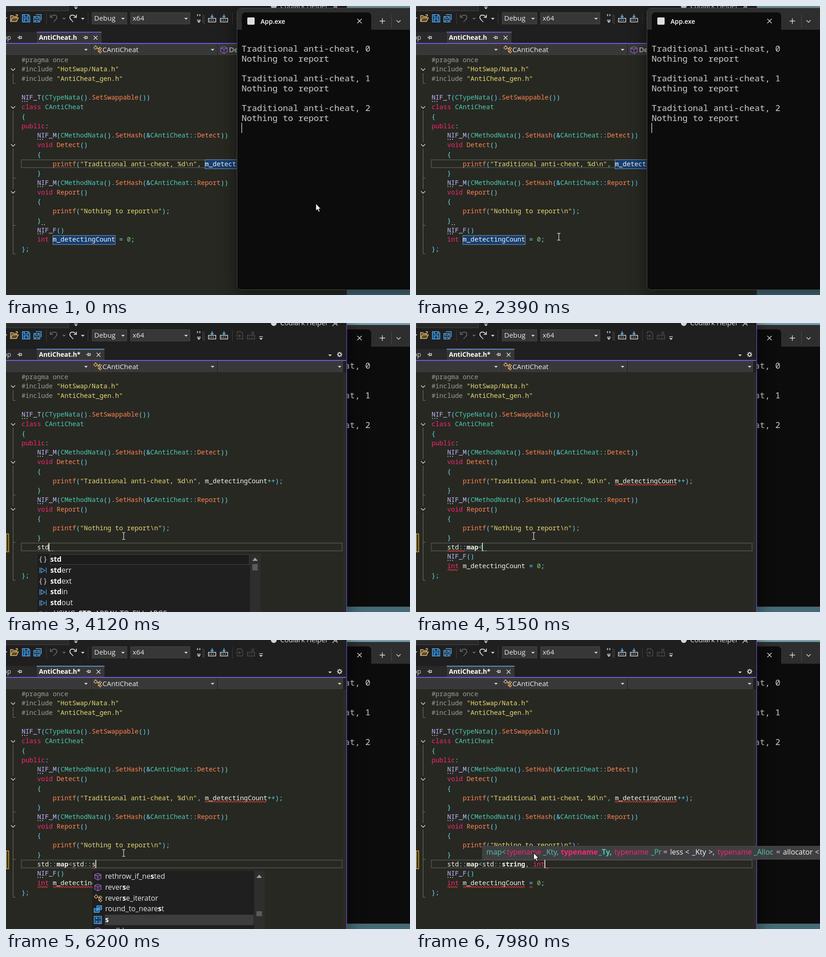
An HTML page with a canvas for the animation above (8000 ms loop, 884 by 633 pixels).

```html
<!DOCTYPE html>
<html lang="en">
<head>
<meta charset="utf-8">
<title>Editing a hot-swapped class</title>
<style>
  html, body { margin: 0; width: 100%; height: 100%; overflow: hidden; background: #1f1f1f; }
  canvas { display: block; }
</style>
</head>
<body>
<canvas id="stage" width="884" height="633"></canvas>
<script>
const ctx = document.getElementById('stage').getContext('2d');
const LOOP = 8000, FRONT = 2690, ENTER = 3620;
const MONO = '"Noto Sans Mono", "DejaVu Sans Mono", monospace', UI = '"Open Sans", "Noto Sans", sans-serif';
const CODE_FONT = '14.23px ' + MONO, TERMINAL_FONT = '500 18.8px ' + MONO;
const CHAR = 8.538, LEFT = 34, LINE = 20.73;
const WHITE = '#f4f4ee', CYAN = '#66d9ef', PINK = '#f92672', TEAL = '#4ec9b0', PURPLE = '#7160e8', BLUE = '#55aaf0';

const column = n => LEFT + n * CHAR;
const lineMid = n => 117.5 + n * LINE;

function rect(x, y, w, h, fill, stroke, width = 1) {
  if (fill) { ctx.fillStyle = fill; ctx.fillRect(x, y, w, h); }
  if (stroke) { ctx.strokeStyle = stroke; ctx.lineWidth = width; ctx.strokeRect(x + width / 2, y + width / 2, w - width, h - width); }
}
function rounded(x, y, w, h, radius, fill, stroke) {
  ctx.beginPath(); ctx.roundRect(x, y, w, h, radius);
  if (fill) { ctx.fillStyle = fill; ctx.fill(); }
  if (stroke) { ctx.strokeStyle = stroke; ctx.lineWidth = 1; ctx.stroke(); }
}
function windowShadow(x, y, w, h) {
  ctx.save();
  ctx.shadowColor = 'rgba(0, 0, 0, 0.5)'; ctx.shadowBlur = 36; ctx.shadowOffsetY = 8;
  rounded(x, y, w, h, 8, '#0c0c0c');
  ctx.restore();
}
function text(str, x, y, color, font) {
  ctx.font = font; ctx.fillStyle = color; ctx.fillText(str, x, y);
  return x + ctx.measureText(str).width;
}
const label = (str, x, y, color = '#ececec', size = 15.2, weight = 400) => text(str, x, y, color, `${weight} ${size}px ${UI}`);
function shape(d, x, y, stroke, width = 1.3, fill) {
  ctx.save(); ctx.translate(x, y);
  const path = new Path2D(d);
  if (fill) { ctx.fillStyle = fill; ctx.fill(path); }
  if (stroke) { ctx.strokeStyle = stroke; ctx.lineWidth = width; ctx.stroke(path); }
  ctx.restore();
}
const downArrow = (x, y, color = '#d6d6d6') => shape('M-4 -2H4L0 2Z', x, y, null, 0, color);
const chevron = (x, y, size = 4.5) => shape(`M${-size} ${-size / 2}L0 ${size / 2}L${size} ${-size / 2}`, x, y, '#dcdcdc', 1.4);
const cross = (x, y, size) => shape(`M${-size} ${-size}L${size} ${size}M${size} ${-size}L${-size} ${size}`, x, y, '#e4e4e4', 1.3);
const pin = (x, y) => shape('M-5 0H-1M-1 -4V4M-1 -2H4V2H-1M0 1.5H4', x, y, '#d8d8d8', 1.3);
function dots(x, y, count) {
  for (let i = 0; i < count; i++) rect(x + i * 5, y, 2, 2, '#a8a8a8');
}
function squiggle(x1, x2, line) {
  const y = lineMid(line) + 8.8;
  ctx.beginPath();
  for (let x = x1, i = 0; x <= x2; x += 2.5, i++) ctx.lineTo(x, y + (i % 2 ? -1.4 : 1.4));
  ctx.strokeStyle = '#e23c38'; ctx.lineWidth = 1.1; ctx.stroke();
}

const SOURCE = `#pragma once
#include "HotSwap/Nata.h"
#include "AntiCheat_gen.h"

NIF_T(CTypeNata().SetSwappable())
class CAntiCheat
{
public:
    NIF_M(CMethodNata().SetHash(&CAntiCheat::Detect))
    void Detect()
    {
        printf("Traditional anti-cheat, %d\\n", m_detectingCount++);
    }
    NIF_M(CMethodNata().SetHash(&CAntiCheat::Report))
    void Report()
    {
        printf("Nothing to report\\n");
    }
    NIF_F()
    int m_detectingCount = 0;
};`.split('\n');

const RULES = [
  [/^"/, '#e6db74'], [/^#/, '#9b9b9b'], [/^NIF_/, '#beb7ff'], [/^(class|public|void|int)$/, PINK],
  [/^(CTypeNata|CAntiCheat|CMethodNata)$/, TEAL], [/^(SetSwappable|SetHash|Detect|Report|printf)$/, '#ff8454'],
  [/^\d/, '#8cc56a'], [/^\w/, WHITE], [/./, CYAN]
];
function codeLine(str, line) {
  for (const m of str.matchAll(/"[^"]*"|#pragma once|#\w+|\w+|[^\s\w"]+/g)) {
    const color = RULES.find(([rule]) => rule.test(m[0]))[1];
    const weight = /^(map|string)$/.test(m[0]) ? 700 : 500;
    text(m[0], column(m.index), lineMid(line) + 5, color, weight + ' ' + CODE_FONT);
  }
}

// Completion lists: icon kind and entry
const STD = { width: 488, outlined: true, selected: 0, thumb: 528, items: [
  ['ns', 'std'], ['macro', 'stderr'], ['ns', 'stdext'], ['macro', 'stdin'], ['macro', 'stdout'], ['macro', '_USING_STD_ARRAY_TO_FILL_ARGS']] };
const NAMESPACE = { width: 461, outlined: true, selected: 0, thumb: 528, items: [
  ['cube', 'abort'], ['cube', 'abs'], ['cube', 'accumulate'], ['cube', 'acos'], ['cube', 'acosh'], ['class', 'add_const']] };
const MAP = { width: 461, selected: 1, thumb: 570, items: [
  ['cube', 'make_pair'], ['class', 'map'], ['class', 'match_results'], ['cube', 'max'], ['cube', 'max_element'], ['cube', 'merge']] };
const S_LIST = { width: 377, selected: 4, thumb: 594, items: [
  ['cube', 'rethrow_if_nested'], ['cube', 'reverse'], ['class', 'reverse_iterator'], ['enum', 'round_to_nearest'], ['snippet', 's'], ['cube', 'scalbln']] };
const STRING = { width: 373, selected: 0, thumb: 594, items: [
  ['class', 'string'], ['class', 'string_view'], ['class', 'stringbuf'], ['class', 'stringstream'], ['cube', 'stod'], ['cube', 'stoi']] };

const TYPING = [
  [0, ''], [3840, 's'], [4000, 'st', STD], [4080, 'std', STD], [4300, 'std:'], [4460, 'std::', NAMESPACE],
  [4560, 'std::m', MAP], [4660, 'std::ma', MAP], [4780, 'std::map', MAP], [5150, 'std::map<'],
  [5350, 'std::map<s', STD], [5450, 'std::map<st', STD], [5560, 'std::map<std', STD], [5830, 'std::map<std:'],
  [5950, 'std::map<std::', NAMESPACE], [6120, 'std::map<std::s', S_LIST], [6360, 'std::map<std::st', STRING],
  [6510, 'std::map<std::str', STRING], [6600, 'std::map<std::stri', STRING], [6690, 'std::map<std::strin', STRING],
  [6950, 'std::map<std::string', STRING], [7110, 'std::map<std::string'], [7410, 'std::map<std::string,'],
  [7600, 'std::map<std::string, '], [7820, 'std::map<std::string, i'], [7900, 'std::map<std::string, in'], [7980, 'std::map<std::string, int']
];
const typedAt = t => TYPING.findLast(step => step[0] <= t);

function itemIcon(kind, x, y) {
  if (kind === 'ns') label('{ }', x - 8, y + 5, '#e0e0e0', 15.5);
  if (kind === 'macro') shape('M-7 -6V6M7 -6V6M-4 -5L4 0L-4 5Z', x, y, BLUE, 1.3);
  if (kind === 'cube') shape('M0 -7L7 -4V4L0 8L-7 4V-4ZM-7 -4L0 -1L7 -4M0 -1V8', x, y, '#8a63ad', 1.4, '#352a40');
  if (kind === 'class') shape('M-8 -3L-4 -8L0 -4L-4 0ZM-2 -2H5M2 -2V5H5M5 -5L9 -2L6 1L3 -2ZM6 2L9 5L6 8L3 5Z', x, y, '#e5b36e', 1.3);
  if (kind === 'enum') shape('M-2 -7H8V1H-2ZM1 -3H6M-8 -1H3V7H-8ZM-5 3H0', x, y, BLUE, 1.6, '#164d78');
  if (kind === 'snippet') shape('M-8 -8H8V8H-8ZM-5 -4H-1M-3 -6V-2M2 -4H6M-5 2L-1 6M-1 2L-5 6M2 3H6M2 6H6', x, y, BLUE, 1.4, '#173c59');
}
function popup(list, word, x) {
  const right = x + list.width, bar = right - 23;
  rect(x, 506, list.width, 127, '#1f1f1f');
  rect(bar, 506, 23, 127, '#2e2e2e');
  shape('M-6 3H6L0 -4Z', right - 12, 518, null, 0, '#a0a0a0');
  rect(right - 18, list.thumb, 12, list.outlined ? 14 : 11, '#5a5a5a');
  list.items.forEach(([kind, name], i) => {
    const y = 518 + i * 23.8;
    if (i === list.selected) rect(x + 27, y - 11.5, list.width - 51, 23, list.outlined ? '#1c1c1c' : '#3d3d3d', list.outlined ? '#4b4b4b' : null);
    itemIcon(kind, x + 12, y);
    const at = name.toLowerCase().indexOf(word), end = at + word.length;
    let pen = label(name.slice(0, at), x + 28, y + 5, '#e6e6e6', 15.7);
    pen = label(name.slice(at, end), pen, y + 5, '#ffffff', 15.7, 700);
    label(name.slice(end), pen, y + 5, '#e6e6e6', 15.7);
  });
}

const SIGNATURE = [
  [154, 'map<', TEAL], [199, 'typename', PINK], [278, '_Kty,', TEAL], [317, 'typename', PINK], [400, '_Ty,', TEAL],
  [434, 'typename', PINK], [514, '_Pr', TEAL], [541, '=', '#ddd'], [556, 'less', WHITE], [589, '<', WHITE], [604, '_Kty', WHITE],
  [640, '>,', WHITE], [660, 'typename', PINK], [739, '_Alloc', TEAL], [788, '=', '#ddd'], [803, 'allocator', WHITE], [873, '<', WHITE]
];
function signatureHelp(y, active) {
  rect(145, y, 760, 30, '#3f3f41', '#4a4a4c');
  const first = 1 + active * 2;
  SIGNATURE.forEach(([x, str, color], i) => {
    const bold = i === first || i === first + 1;
    const shift = active === 0 && i > 1 && i < 5 ? 5 : 0;
    label(str, x + shift, y + 18.5, color, 16, bold ? 700 : 400);
  });
}

function toolbar() {
  rect(0, 0, 746, 108, '#1f1f1f');
  rect(0, 0, 137, 11, '#292929', '#454545');
  shape('M-4 -3H4M-4 0H4', 153, 1, '#ddd', 1.2); downArrow(153, 5);
  downArrow(-1, 27);
  shape('M-8 7V-6H-3L-1 -4H5V-1H9L5 7ZM-8 7L-4 -1H6M3 -8H7V-4', 18, 27, '#e2ba76', 1.5, '#5a492c');
  const floppy = 'M-8 -8H5L8 -5V8H-8ZM-4 -8V-3H4V-8M-4 8V1H4V8';
  shape(floppy, 44, 27, BLUE, 1.6, '#123f63');
  shape('M-4 -8H8V4M-8 -4H4L5 -3V8H-8ZM-5 -4V0H2V-4M-5 8V4H2V8', 69, 27, BLUE, 1.6);
  for (const x of [88, 179, 495]) rect(x, 15, 1, 25, '#3d3d3d');
  const undo = 'M-7 -8V-2H-1M-6 -2C-3 -8 5 -9 7 -4C9 1 3 4 0 8';
  shape(undo, 104, 27, '#666', 1.7); downArrow(127, 28, '#666');
  ctx.save(); ctx.translate(147, 27); ctx.scale(-1, 1); shape(undo, 0, 0, '#dcdcdc', 1.7); ctx.restore();
  downArrow(168, 28);
  rect(188, 14, 77, 26, '#373737', '#474747'); label('Debug', 193, 32); downArrow(256, 28);
  rect(272, 14, 131, 26, '#373737', '#474747'); label('x64', 277, 32); downArrow(394, 28);
  shape('M-4 -9L-2 -7L-4 -5M1 -9L3 -7L1 -5M-4 4H4', 422, 27, '#ddd', 1.3); downArrow(422, 35);
  for (let y = 19; y < 38; y += 4) { rect(430, y, 1.5, 1.5, '#777'); rect(433, y + 2, 1.5, 1.5, '#777'); }
  for (const x of [451, 477]) {
    shape('M-8 0H8V8H-8ZM-5 3V5M-1 3V5M3 3V5', x, 27, '#d8d8d8', 1.5);
    shape('M0 -9V-3M-3 -5L0 -2L3 -5', x, 27, BLUE, 1.8);
  }
  shape('M-5 -8H3L7 -4V8H-5V4M-5 -2V-8M-8 1H2M-1 -2L2 1L-1 4', 511, 27, '#4d4d4d', 1.5);
  shape('M-8 0H8V8H-8ZM-4 3V5M2 3V5M1 -8L7 -2M7 -8L1 -2', 536, 27, '#4d4d4d', 1.5);
  shape('M-4 0H4', 558, 30, '#ddd', 1.3); downArrow(558, 35);
  ctx.beginPath(); ctx.arc(586, 0, 6.5, 0, 7); ctx.fillStyle = '#d6d6d6'; ctx.fill();
  label('Codlark Helper', 600, 5, '#e0e0e0', 15);
  shape('M-6 7C-5 1 3 1 4 6M-4 -2A4 4 0 1 0 4 -2M6 -1L9 -4', 721, 0, '#ddd', 1.4);
}

function tabs(t) {
  const edited = t >= ENTER, shift = edited ? 6.5 : 0;
  rect(0, 57, 66, 24, '#292929');
  label('op', -6, 74, '#d8d8d8', 14); pin(30, 69);
  rect(67, 57, 142 + shift, 25, '#373737');
  rect(67, 56.5, 142 + shift, 1.8, edited ? '#6c9fd8' : PURPLE);
  label(edited ? 'AntiCheat.h*' : 'AntiCheat.h', 72, 74, '#ffffff', 14, 700);
  pin(174 + shift, 69); cross(196 + shift, 69.5, 4.2);
  rect(0, 81, 744, 2, PURPLE);
  downArrow(709, 71);
  ctx.beginPath(); ctx.arc(730, 69, 3.4, 0, 7); ctx.strokeStyle = '#ddd'; ctx.lineWidth = 2; ctx.stroke();
  for (let i = 0; i < 8; i++) {
    const a = i * Math.PI / 4;
    rect(729.2 + 5 * Math.cos(a), 68.2 + 5 * Math.sin(a), 1.6, 1.6, '#ddd');
  }
  rect(0, 83, 738, 25, '#2b2b2b');
  for (const [x, w] of [[0, 186], [188, 273], [464, 273]]) rect(x, 84, w, 23, '#383838', '#424242');
  label(':', -3, 101);
  for (const x of [175, 452, 730]) downArrow(x, 96);
  itemIcon('class', 200, 95); label('CAntiCheat', 211, 101);
  if (!edited) {
    itemIcon('cube', 477, 96);
    label(t < FRONT ? 'Detect()' : 'Report()', 488, 101);
  }
}

function editor(t) {
  const front = t >= FRONT, edited = t >= ENTER, typed = typedAt(t)[1];
  if (front) windowShadow(-20, -20, 766, 680);
  ctx.save();
  ctx.beginPath(); ctx.rect(0, 0, 746, 633); ctx.clip();
  toolbar();
  tabs(t);
  rect(0, 108, 738, 525, '#272822');
  rect(738, 108, 8, 525, '#2a2a2b');

  // Outline margin
  const end = edited ? 563.5 : 543;
  shape(`M15.5 147V169.500H21M15.5 229V${end}H21M15.5 377H21M15.5 480.500H21`, 0, 0, '#777770', 1);
  for (const y of [139, 222, 305, 408]) { rect(9, y - 7, 13, 14, '#272822'); chevron(15.5, y); }
  if (edited) rect(0, 461, 6.5, 41, '#34321f', '#c9a43d', 1.5);

  const current = edited ? 18 : front ? 17 : 11;
  rect(32.5, lineMid(current) - 9.6, 704, 19, null, '#4a4a48', 2);
  if (!front) {
    rect(435, 336, 138, 21, '#173f70', '#7d94ac');
    rect(102, 502, 137.500, 21, '#173f70', '#7d94ac');
  }
  SOURCE.forEach((str, i) => codeLine(str, edited && i > 17 ? i + 1 : i));

  dots(35, 208, 3); dots(69, 291, 3); dots(69, 394.500, 3);
  dots(69, edited ? 519 : 498, 3);
  const caretX = edited ? column(4 + typed.length) : 77;
  if (edited) {
    codeLine('    ' + typed, 18);
    if (t < 5830) dots(typed ? caretX + 2 : 35, 498, 2);
  } else dots(78, 478, 2);

  if (t >= 4860) {
    squiggle(435, 572, 11);
    squiggle(69, 93, 20);
    if (t < 5830) squiggle(69, 108, 18);
    else squiggle(103, 239, 20);
    if (t >= 5830 && t < 7110) { squiggle(145, 153, 18); squiggle(188, 196, 18); }
    if (t >= 7410) { squiggle(248, 257, 20); squiggle(caretX + 1, caretX + 10, 18); }
  }
  if (front && !(t >= 3400 && t < ENTER)) rect(caretX - 0.5, lineMid(current) - 9, 1.6, 18, '#ffffff');
  rect(745, 0, 1, 633, front ? PURPLE : '#3a3a3c');
  ctx.restore();
}

function terminal(t) {
  if (t < FRONT) windowShadow(505, 4, 420, 618);
  rounded(505.5, 4.5, 420, 617, 8, '#0c0c0c', '#4a4a4a');
  rounded(506, 5, 420, 47, [8, 0, 0, 0], '#2e2e2e');
  rounded(516, 14, 283, 40, [8, 8, 0, 0], '#0c0c0c');
  rounded(528, 25, 16, 16, 2, '#dedede');
  label('App.exe', 557, 39, '#ffffff', 14, 600);
  cross(773.5, 33, 4.8);
  shape('M-6 0H6M0 -6V6', 823.5, 33, '#e4e4e4', 1.4);
  rect(843, 19, 1, 28, '#4c4c4c');
  chevron(859, 33.5);
  for (let i = 0; i < 3; i++) {
    const y = 100 + i * 65;
    text('Traditional anti-cheat, ' + i, 515.5, y, '#cccccc', TERMINAL_FONT);
    text('Nothing to report', 515.5, y + 21.7, '#cccccc', TERMINAL_FONT);
  }
  const caretOn = t < 400 || (t >= 950 && t < 1480) || (t >= 2010 && t < 2540);
  if (caretOn) rect(515, 256, 1.5, 22, '#cccccc');
}

const MOUSE = [[0, 678, 433], [950, 678, 433], [1440, 568, 475], [1730, 531, 494], [2550, 260, 508],
  [2590, 256, 504], [2660, 230, 478], [3120, 230, 478], [3180, 256, 468], [3380, 256, 468], [3430, 257.5, 466.5], [LOOP, 257.5, 466.5]];
function mouseAt(t) {
  const i = MOUSE.findIndex(key => key[0] > t);
  const [t0, x0, y0] = MOUSE[i - 1], [t1, x1, y1] = MOUSE[i];
  const k = (t - t0) / (t1 - t0);
  return [x0 + (x1 - x0) * k, y0 + (y1 - y0) * k];
}
function pointer(t, overHelp) {
  const [x, y] = mouseAt(t);
  if (overHelp || (t < FRONT && x > 505))
    shape('M0 0V15.500L3.600 12.300L6.200 18L8.800 16.900L6.300 11.400H11Z', x, y, '#000', 1, '#fff');
  else
    shape('M-3.500 -7.500H-1L0 -6.500L1 -7.500H3.500M0 -6.500V6.500M-3.500 7.500H-1L0 6.500L1 7.500H3.500', x, y, '#e8e8e8', 1.2);
}

function draw(t) {
  rect(0, 0, 884, 633, '#78a0aa');
  rect(0, 600, 884, 33, '#466b76');
  const layers = [editor, terminal];
  if (t >= FRONT) layers.reverse();
  layers.forEach(layer => layer(t));

  const [, typed, list] = typedAt(t);
  const helpAbove = (t >= 5350 && t < 5830) || t >= 7450;
  if (list) {
    const word = typed.match(/\w*$/)[0];
    popup(list, word, Math.round(column(4 + typed.length - word.length)) + 1);
  }
  if (t >= 5210 && t < 5350) signatureHelp(505, 0);
  if (helpAbove) signatureHelp(451, t >= 7410 ? 1 : 0);
  pointer(t, helpAbove);
}

function tick() {
  draw(performance.now() % LOOP);
  requestAnimationFrame(tick);
}
tick();
</script>
</body>
</html>
```
